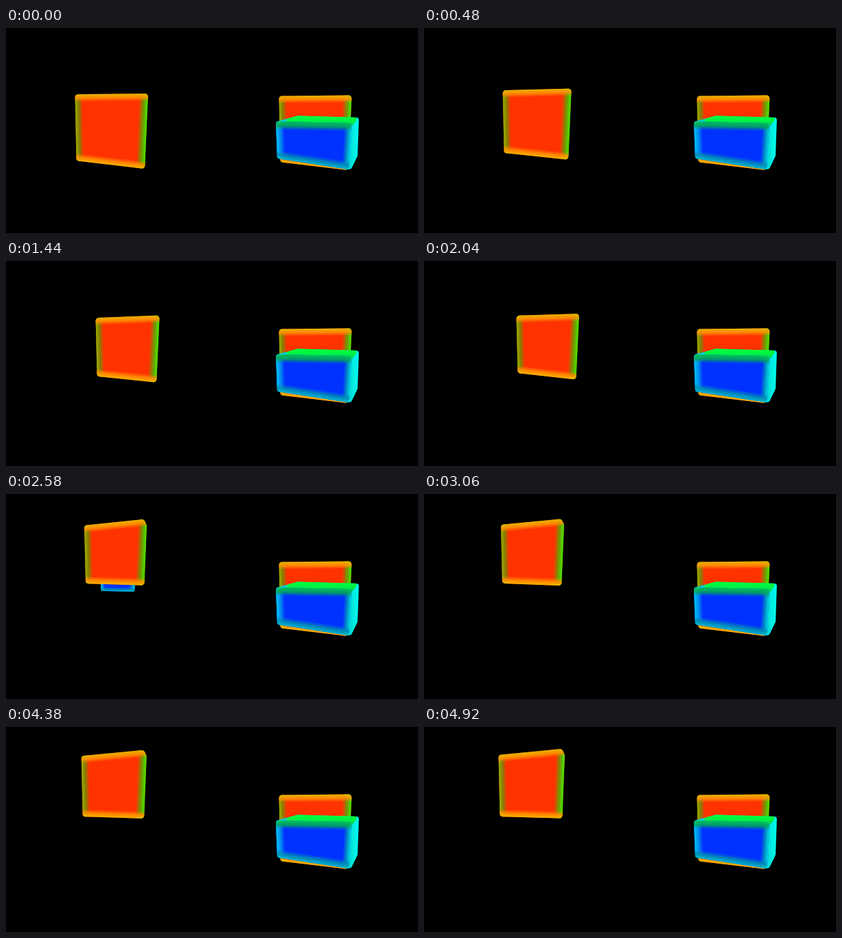
These frames come from a looping animation (600 by 300 pixels, 4980 ms). An HTML page with a canvas:

```html
<!DOCTYPE html>
<html lang="en">
<head>
<meta charset="utf-8">
<title>Box pose fitting</title>
<style>
  html, body { margin: 0; width: 100%; height: 100%; overflow: hidden; background: #000; }
  canvas { display: block; width: 600px; height: 300px; }
</style>
</head>
<body>
<canvas id="stage" width="600" height="300"></canvas>
<script>
const ctx = document.getElementById('stage').getContext('2d');
const LOOP = 4980, STEP = 60, SETTLED = 3060;

// A pose is the top left corner, the width and how far the top edge rises.
const KEYS = [
  { t: 0, x: 100.5, y: 97, w: 106.5, rise: 1 },
  { t: 900, x: 127, y: 86, w: 94.5, rise: 4 },
  { t: 2040, x: 134.5, y: 80, w: 91.5, rise: 3 },
  { t: 2580, x: 114, y: 46, w: 91, rise: 9 },
  { t: 2720, x: 109, y: 37, w: 96, rise: 9 },
  { t: SETTLED, x: 112, y: 45, w: 92, rise: 8.5 },
  { t: 4920, x: 108.5, y: 41, w: 96.5, rise: 9 }
];

// Each side runs from its outer colour to its inner one, then into the face.
const WARM = {
  face: '#ff3200',
  left: ['140,185,0', '125,130,0'],
  right: ['50,250,0', '105,155,0'],
  top: ['225,190,0', '255,145,0'],
  bottom: ['245,190,0', '255,140,0']
};
const COOL = {
  face: '#0032ff',
  left: ['0,205,255', '0,150,235'],
  right: ['0,225,225', '0,140,190'],
  top: ['0,205,75', '0,165,90'],
  bottom: ['0,190,205', '0,140,180']
};

const lerp = (a, b, u) => a + (b - a) * u;

function roundPath(pts, r) {
  const n = pts.length, last = pts[n - 1];
  ctx.beginPath();
  ctx.moveTo((last[0] + pts[0][0]) / 2, (last[1] + pts[0][1]) / 2);
  pts.forEach((p, i) => ctx.arcTo(...p, ...pts[(i + 1) % n], r));
  ctx.closePath();
}

function fillGradient(x0, y0, x1, y1, colors) {
  const g = ctx.createLinearGradient(x0, y0, x1, y1);
  colors.forEach((c, i) => g.addColorStop(i / (colors.length - 1), c));
  ctx.fillStyle = g;
  ctx.fill();
}

// Shade inward from the edge a-b.
function band(a, b, width, [outer, inner]) {
  const dx = b[0] - a[0], dy = b[1] - a[1], k = width / Math.hypot(dx, dy);
  fillGradient(a[0], a[1], a[0] - dy * k, a[1] + dx * k,
    [`rgba(${outer},.92)`, `rgba(${inner},.9)`, `rgba(${inner},0)`]);
}

function panel([tl, tr, br, bl], look, { chamfer = 0, side = 9, rim = 11, radius = 4.5 } = {}) {
  const peak = [tr[0] - chamfer * 0.45, tr[1]];
  const edge = [tr[0], tr[1] + chamfer];
  roundPath(chamfer ? [tl, peak, edge, br, bl] : [tl, tr, br, bl], radius);
  ctx.fillStyle = look.face;
  ctx.fill();
  band(bl, tl, rim, look.left);
  band(edge, br, side, look.right);
  band(tl, peak, rim, look.top);
  band(br, bl, rim, look.bottom);
}

// The rest of the outline follows from width and rise.
function slab({ x, y, w, rise }) {
  const base = y + 0.91 * w + 0.25 * rise;
  const drop = 13 - 1.15 * rise;
  const corners = [[x, y], [x + w, y - rise], [x + w - 5 + 0.15 * rise, base + drop], [x + 2, base]];
  panel(corners, WARM, { chamfer: rise > 6 ? rise : 0, side: 13 });
}

function poseAt(t) {
  const i = Math.max(1, KEYS.findIndex(k => k.t >= t));
  const a = KEYS[i - 1], b = KEYS[i], u = (t - a.t) / (b.t - a.t);
  const sway = t > SETTLED ? Math.sin((t - SETTLED) / 372 * 2 * Math.PI) : 0;
  return {
    x: lerp(a.x, b.x, u) - sway * 0.6,
    y: lerp(a.y, b.y, u) - sway,
    w: lerp(a.w, b.w, u) + sway * 0.6,
    rise: lerp(a.rise, b.rise, u)
  };
}

function drawMoving(t) {
  const pose = poseAt(t);
  const peek = 1 - Math.abs(t - 2580) / 110;
  if (peek > 0) {
    const x = pose.x + 24, y = pose.y + 78 + 10 * (peek - 1);
    panel([[x, y], [x + 51, y], [x + 49, y + 19], [x, y + 18]], COOL, { rim: 6, radius: 3 });
  }
  slab(pose);
}

function drawFixed() {
  slab({ x: 397.5, y: 99.5, w: 106, rise: 1 });

  const frontTL = [393, 137], frontTR = [503, 139], frontBR = [499, 207], frontBL = [395, 191];
  const backL = [425, 128.5], backR = [514, 131], low = [512, 187];
  roundPath([frontTL, backL, backR, low, [503, 206], frontBR, frontBL], 4);
  fillGradient(498, 0, 514, 0, ['#00cdd2', '#00ebe1', '#00fff0']);
  roundPath([frontTL, backL, backR, [503, 144]], 3);
  fillGradient(0, 130, 0, 144, ['#00ff3c', '#00f046', '#00be50']);
  panel([frontTL, frontTR, frontBR, frontBL], COOL, { side: 10, rim: 12 });
}

function draw(t) {
  ctx.fillStyle = '#000';
  ctx.fillRect(0, 0, 600, 300);
  drawMoving(t);
  drawFixed();
}

const start = performance.now();
function tick() {
  const t = (performance.now() - start) % LOOP;
  draw(Math.floor(t / STEP) * STEP);
  requestAnimationFrame(tick);
}
tick();
</script>
</body>
</html>
```
